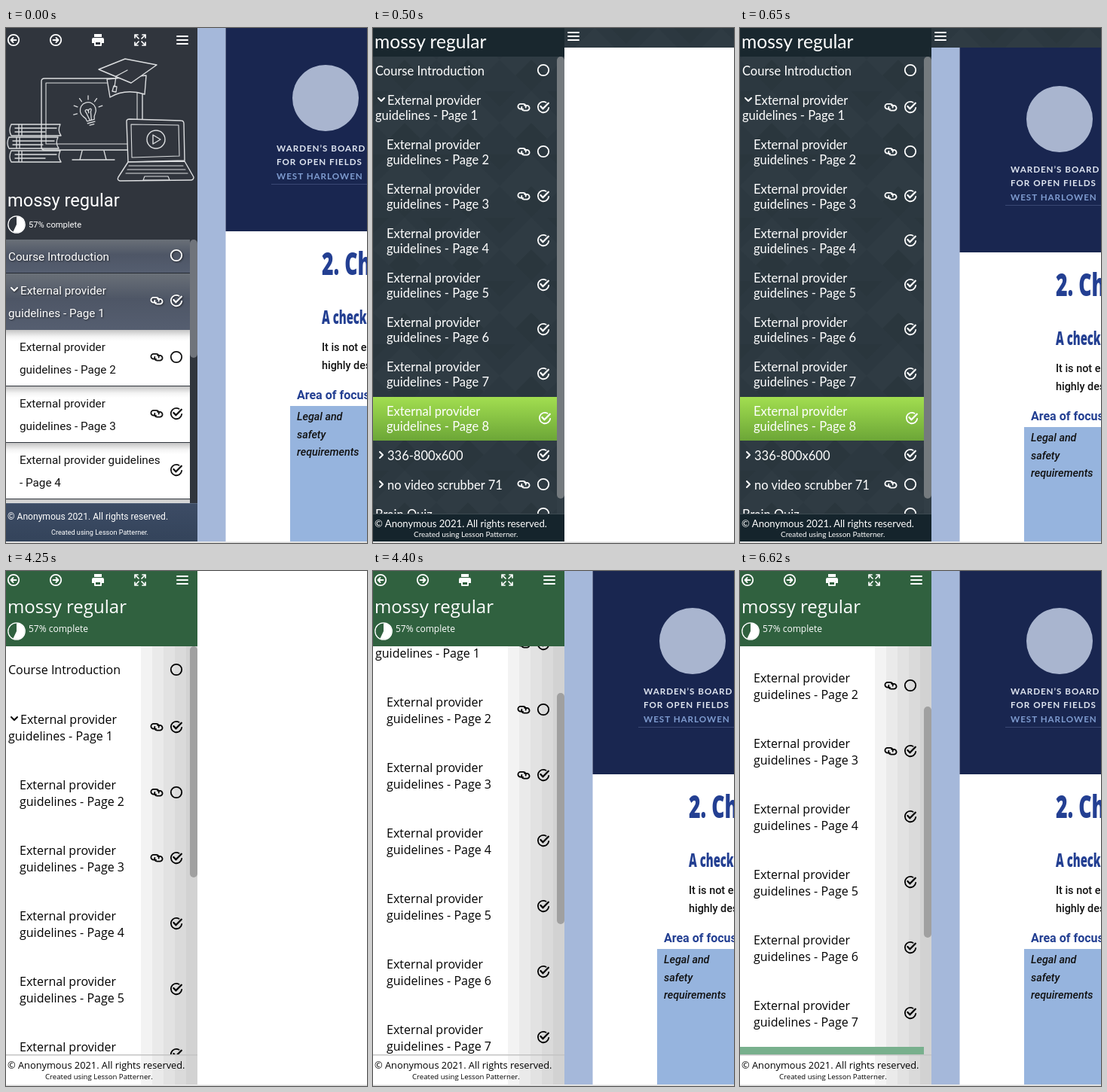
These frames come from a looping animation (479 by 684 pixels, 8 s). An HTML page:

```html
<!DOCTYPE html>
<html lang="en">
<head>
<meta charset="utf-8">
<title>Course themes</title>
<style>
  html, body { margin: 0; width: 100%; height: 100%; overflow: hidden; background: #fff; }
  #stage { display: block; width: 479px; height: 684px; }
  .slate { font-family: Roboto, sans-serif; }
  .dusk { font-family: Lato, sans-serif; }
  .leaf { font-family: "Open Sans", sans-serif; }
  .doc { font-family: Roboto, sans-serif; }
  .display { font-family: "Open Sans", sans-serif; font-weight: 800; }
  .raised { filter: drop-shadow(1px 1px 1px #0009); }
  .line { fill: none; stroke: currentColor; stroke-linecap: round; stroke-linejoin: round; }
  text { fill: currentColor; white-space: pre; }
</style>
</head>
<body>
<svg id="stage" viewBox="0 0 479 684" xmlns="http://www.w3.org/2000/svg"></svg>
<script>
const LOOP = 8000;
const TITLE = 'mossy regular';
const RIGHTS = '© Anonymous 2021. All rights reserved.';
const CREDIT = 'Created using Lesson Patterner.';

// start time, theme, slide offset (null = blank page), list scroll
const STEPS = [
  [0, 'slate', 0, 0],
  [500, 'dusk', null, 0],
  [650, 'dusk', 28, 0],
  [4250, 'leaf', null, 0],
  [4400, 'leaf', 0, 110],
  [4540, 'leaf', 0, 142]
];

const rect = (x, y, w, h, fill, extra = '') =>
  `<rect x="${x}" y="${y}" width="${w}" height="${h}" fill="${fill}" ${extra}/>`;
const text = (x, y, size, str, extra = '') =>
  `<text x="${x}" y="${y}" font-size="${size}" ${extra}>${str}</text>`;
const line = (d, width = 2, extra = '') =>
  `<path class="line" d="${d}" stroke-width="${width}" ${extra}/>`;
const at = (x, y, body) => `<g transform="translate(${x} ${y})">${body}</g>`;
const clip = (x, y, w, h, body) =>
  `<svg x="${x}" y="${y}" width="${w}" height="${h}" viewBox="${x} ${y} ${w} ${h}">${body}</svg>`;
const group = (color, body, extra = '') => `<g color="${color}" ${extra}>${body}</g>`;
const fade = (id, ...stops) =>
  `<linearGradient id="${id}" x2="0" y2="1">${stops.map(([o, c]) =>
    `<stop offset="${o}" stop-color="${c}"/>`).join('')}</linearGradient>`;

const ring = '<circle class="line" r="7.2" stroke-width="1.8"/>';
const icons = {
  open: ring,
  done: line('M3.5 -6.3A7.2 7.2 0 1 0 7.2 .8', 1.8) + line('M-3.6 -1L-.6 2.3L6.8 -5.2', 2.3),
  link: line('M-1 2.6H-4.2A3.4 3.4 0 0 1 -4.2 -4.2H-.4A3.4 3.4 0 0 1 2.6 .6', 1.8) +
        line('M1 -2.2H4.2A3.4 3.4 0 0 1 4.2 4.6H.4A3.4 3.4 0 0 1 -2.6 -.2', 1.8),
  down: line('M-4 -2L0 2L4 -2'),
  right: line('M-2 -4L2 0L-2 4'),
  next: ring + line('M-3.5 0H3M.5 -3L3.5 0L.5 3', 1.8),
  menu: line('M-7 -5H7M-7 0H7M-7 5H7', 2),
  print: '<path fill="currentColor" d="M-5 -8H5V-4H-5ZM-6 -3H6Q8 -3 8 -1V4H5V1H-5V4H-8V-1Q-8 -3 -6 -3Z"/>' +
         line('M-4 2H4V7H-4Z', 2),
  expand: [0, 90, 180, 270].map(a =>
    line('M-2 -2L-7 -7M-7 -3V-7H-3', 1.7, `transform="rotate(${a})"`)).join('')
};
const icon = (name, x, y) => at(x, y, icons[name]);

const toolbar = y => at(10, y, `<g transform="scale(-1 1)">${icons.next}</g>`) +
  icon('next', 66, y) + icon('print', 122, y) + icon('expand', 178, y) + icon('menu', 234, y);

const pie = (y, back) => {
  const a = 2 * Math.PI * .57;
  const end = `${10.8 * Math.sin(a)} ${-10.8 * Math.cos(a)}`;
  return at(14, y, `<circle r="11.2" fill="${back}" stroke="#fff" stroke-width="1.3"/>
    <path fill="#fff" d="M0 0V-10.8A10.8 10.8 0 1 1 ${end}Z"/>`);
};

const marks = (kind, y, dx = 0) => (kind.includes('link') ? icon('link', 200, y) : '') +
  icon(kind.includes('open') ? 'open' : 'done', 226 + dx, y);

// two-line entry for one page of the guidelines
const page = (n, y, gap, size, markY, kind, dx) =>
  text(n === 1 ? 19 : 18, y, size, 'External provider') +
  text(n === 1 ? 3 : 18, y + gap, size, 'guidelines - Page ' + n) + marks(kind, markY, dx);
const kindOf = n => ['', 'link done', 'link open', 'link done'][n] || 'done';

const footer = (y1, size1, x2, y2, size2) => text(2, y1, size1, RIGHTS) + text(x2, y2, size2, CREDIT);

const book = (x, y) => line(`M${x} ${y}H${x + 65}M${x + 66} ${y + 15}H${x}Q${x - 4} ${y + 8} ${x} ${y}
  M${x + 65} ${y}Q${x + 61} ${y + 8} ${x + 66} ${y + 15}M${x + 5} ${y + 5}H${x + 60}M${x + 5} ${y + 10}H${x + 45}
  M${x + 10} ${y}V${y + 15}M${x + 14} ${y}V${y + 15}`, 1.3);

function sketch() {
  const solid = d => `<path class="line" style="fill:#31353d" stroke-width="1.4" d="${d}"/>`;
  const rays = [-180, -145, -110, -75, -40, -5].map(a =>
    line('M15 0H20', 1.3, `transform="rotate(${a})"`)).join('');
  const bulb = line('M-5 13Q-5 9 -8 6A10.5 10.5 0 1 1 8 6Q5 9 5 13ZM-5 16H5M-3 19H3M-1 13L-3 2Q-5 -2 -2 -2T0 3Q0 -2 3 -2T3 2L1 13', 1.3);
  return group('#dcdee0',
    line('M47 71Q47 67 51 67H177Q181 67 181 71V158Q181 162 177 162H51Q47 162 47 158Z', 1.4) +
    line('M53 73H174V154H53Z', 1.1) +
    line('M101 163L98 175M130 163L133 175M88 175H144', 1.3) +
    `<g transform="translate(109 110) rotate(-15)">${bulb + rays}</g>` +
    book(7, 128) + book(4, 145) + book(7, 163) +
    solid('M134 68L138 92Q158 80 184 88L186 63Z') + solid('M123 55L158 41L200 49L166 73Z') +
    line('M161 56L146 64L144 78M141 84L143 77L147 78L146 85Z', 1.3) +
    solid('M160 124Q160 121 164 121L232 123Q236 123 236 127L237 176L162 178Z') +
    solid('M162 178L237 177L249 198Q249 202 245 202L151 203Q147 202 149 198Z') +
    line('M166 128L229 129L230 170L167 172Z', 1.1) +
    line('M163 183H235M161 188H238M159 193H241M184 197H215L217 202H182Z', 1.1) +
    '<circle class="line" cx="199" cy="148" r="12" stroke-width="1.4"/>' + line('M195 142V154L205 148Z', 1.4));
}

function slate() {
  const size = 15.25;
  const head = rect(0, 0, 254, 684, '#30353d') + sketch() +
    group('#fff', toolbar(16) + text(2, 237, 23.6, TITLE) + pie(261, '#30353d') + text(30, 265, 11.2, '57% complete'));
  let list = rect(0, 281, 244, 45, 'url(#bar)') + rect(0, 326, 244, 75, 'url(#bar)') +
    rect(0, 325, 244, 1, '#252a33') +
    group('#fff', text(3, 309, size, 'Course Introduction') + marks('open', 302) +
      icon('down', 11, 347) + page(1, 354, 30, size, 362, kindOf(1)), 'class="raised"');
  for (let n = 2; n <= 5; n++) {
    const y = 251 + n * 75;
    list += rect(0, y, 244, 75, 'url(#paper)') + rect(0, y + 74, 244, 1, '#30353d');
    if (n < 4) list += group('#111', page(n, y + 28, 30, size, y + 36, kindOf(n)));
  }
  list += group('#111', text(18, 579, size, 'External provider guidelines') +
    text(18, 609, size, '- Page 4') + marks('done', 587));
  return head + clip(0, 281, 254, 350, list + rect(244, 281, 10, 157, '#70747b', 'rx="5"')) +
    rect(0, 631, 254, 53, 'url(#slateFoot)') + rect(0, 631, 254, 1, '#56657c') +
    group('#fff', footer(653, 12.1, 60, 673, 9.1));
}

function dusk() {
  const size = 16.5;
  let list = text(3, 63, size, 'Course Introduction') + marks('open', 56) + icon('down', 11, 95) +
    rect(0, 490, 244, 58, 'url(#lime)');
  for (let n = 1; n <= 8; n++) {
    const y = 43 + n * 59;
    list += page(n, y, 20, size, y + 3, kindOf(n), n === 8 ? 2 : 0);
  }
  list += icon('right', 11, 567) + text(19, 574, size, '336-800x600') + marks('done', 567) +
    icon('right', 11, 606) + text(19, 613, size, 'no video scrubber 71') + marks('link open', 606) +
    text(3, 652, size, 'Brain Quiz') + marks('open', 645);
  return rect(0, 0, 254, 684, 'url(#weave)') + rect(0, 0, 254, 38, '#19272e') +
    group('#fff', text(2, 27, 24.6, TITLE) + clip(0, 38, 254, 608, list +
      rect(244, 38, 10, 608, '#323e46') + rect(244, 38, 10, 587, '#747a7e', 'rx="5"'))) +
    rect(0, 646, 254, 38, '#15242c') + rect(0, 645, 254, 1, '#3c4950') +
    group('#fff', footer(663, 13.1, 54, 676, 10)) +
    rect(254, 0, 225, 26, 'url(#weave)') + group('#fff', icon('menu', 266, 11));
}

function leaf(scroll) {
  const stripes = ['#f3f3f3', '#eaeaea', '#e2e2e2', '#dadada', '#d2d2d2']
    .map((c, i) => rect(179 + i * 15, 100, 15, 584, c)).join('');
  let list = text(3, 137, 16, 'Course Introduction') + marks('open', 131) + icon('down', 11, 196) +
    rect(0, 774, 244, 87, '#78b08d');
  for (let n = 1; n <= 8; n++) {
    const y = 116 + n * 87;
    list += page(n, y, 22, 16, y + 4, kindOf(n));
  }
  return rect(0, 0, 254, 684, '#fff') + stripes + rect(0, 0, 254, 100, '#30613f') +
    group('#fff', toolbar(12) + text(2, 56, 24, TITLE) + pie(80, '#30613f') + text(30, 81, 12, '57% complete')) +
    group('#000', clip(0, 100, 254, 543, at(0, -scroll, list) +
      rect(244, 100 + scroll * .5636, 10, 307, '#a0a0a0', 'rx="5"')) +
      rect(0, 642, 254, 1.5, '#c4c4c4') + footer(661, 12.8, 52, 675, 9.6));
}

function slide(dy) {
  const narrow = (x, y, size, str) =>
    `<g transform="translate(${x} ${y}) scale(.62 1)" class="display">${text(0, 0, size, str)}</g>`;
  const caps = 'font-family="Lato, sans-serif" font-weight="700" letter-spacing="1"';
  const body = rect(254, -30, 225, 740, '#fff') + rect(254, -30, 37.5, 740, '#a5b8da') +
    rect(291.5, -30, 187.5, 300, '#192650') +
    '<circle cx="424" cy="93" r="44" fill="#a9b5cf"/>' +
    group('#dfe5f0', text(359, 164, 11.6, 'WARDEN’S BOARD OF', caps) + text(359, 182, 11.6, 'FOR OPEN FIELDS', caps)) +
    group('#7f9cd0', text(359, 201, 11.6, 'WEST HARLOWEN', caps)) + rect(352, 207, 127, 1, '#3a4874') +
    group('#233f92', narrow(419, 328, 43, '2. Checklist') + narrow(419, 393, 24, 'A checklist') +
      text(386, 493, 16, 'Area of focus', 'font-weight="700"')) +
    group('#111', text(419, 429, 14.4, 'It is not essential', 'font-weight="500"') +
      text(419, 453, 14.4, 'highly desirable', 'font-weight="500"')) +
    rect(377, 502, 102, 200, '#96b4de') +
    group('#111', ['Legal and', 'safety', 'requirements'].map((s, i) =>
      text(386, 521 + i * 23.5, 14.3, s, 'font-weight="500" font-style="italic"')).join(''));
  return clip(254, dy ? 26 : 0, 225, 684, at(0, dy, body));
}

const defs = '<defs>' +
  fade('bar', [0, '#6a7078'], [.45, '#4e5666'], [1, '#555e70']) +
  fade('paper', [0, '#c4c4c4'], [.12, '#f4f4f4'], [.2, '#fff'], [1, '#fff']) +
  fade('slateFoot', [0, '#3d4c65'], [1, '#33435a']) +
  fade('lime', [0, '#a2de50'], [1, '#6ca637']) +
  `<pattern id="weave" width="84" height="84" patternUnits="userSpaceOnUse">
    ${rect(0, 0, 84, 84, '#2c3840')}
    <path fill="#2f3b43" d="M42 0L84 42L42 84L0 42Z"/>
    <path fill="#2a363d" d="M42 42L63 63L42 84L21 63ZM0 0H21L0 21ZM84 0V21L63 0Z"/>
  </pattern></defs>`;

const stage = document.getElementById('stage');
const themes = { slate, dusk, leaf };
const scenes = STEPS.map(([, theme, dy, scroll]) =>
  `<g class="scene" visibility="hidden">${rect(0, 0, 479, 684, '#fff')}
    ${dy === null ? '' : `<g class="doc">${slide(dy)}</g>`}
    <g class="${theme}">${themes[theme](scroll)}</g>
    ${rect(0, 682, 479, 2, '#fff')}${rect(0, 682.5, 479, 1.5, '#d6d6d6')}</g>`);
stage.innerHTML = defs + scenes.join('');

const layers = [...stage.querySelectorAll('.scene')];
const start = performance.now();
let shown = -1;
function draw() {
  const t = (performance.now() - start) % LOOP;
  const now = STEPS.filter(s => s[0] <= t).length - 1;
  if (now !== shown) {
    layers.forEach((layer, i) => layer.setAttribute('visibility', i === now ? 'visible' : 'hidden'));
    shown = now;
  }
  requestAnimationFrame(draw);
}
draw();
</script>
</body>
</html>
```
